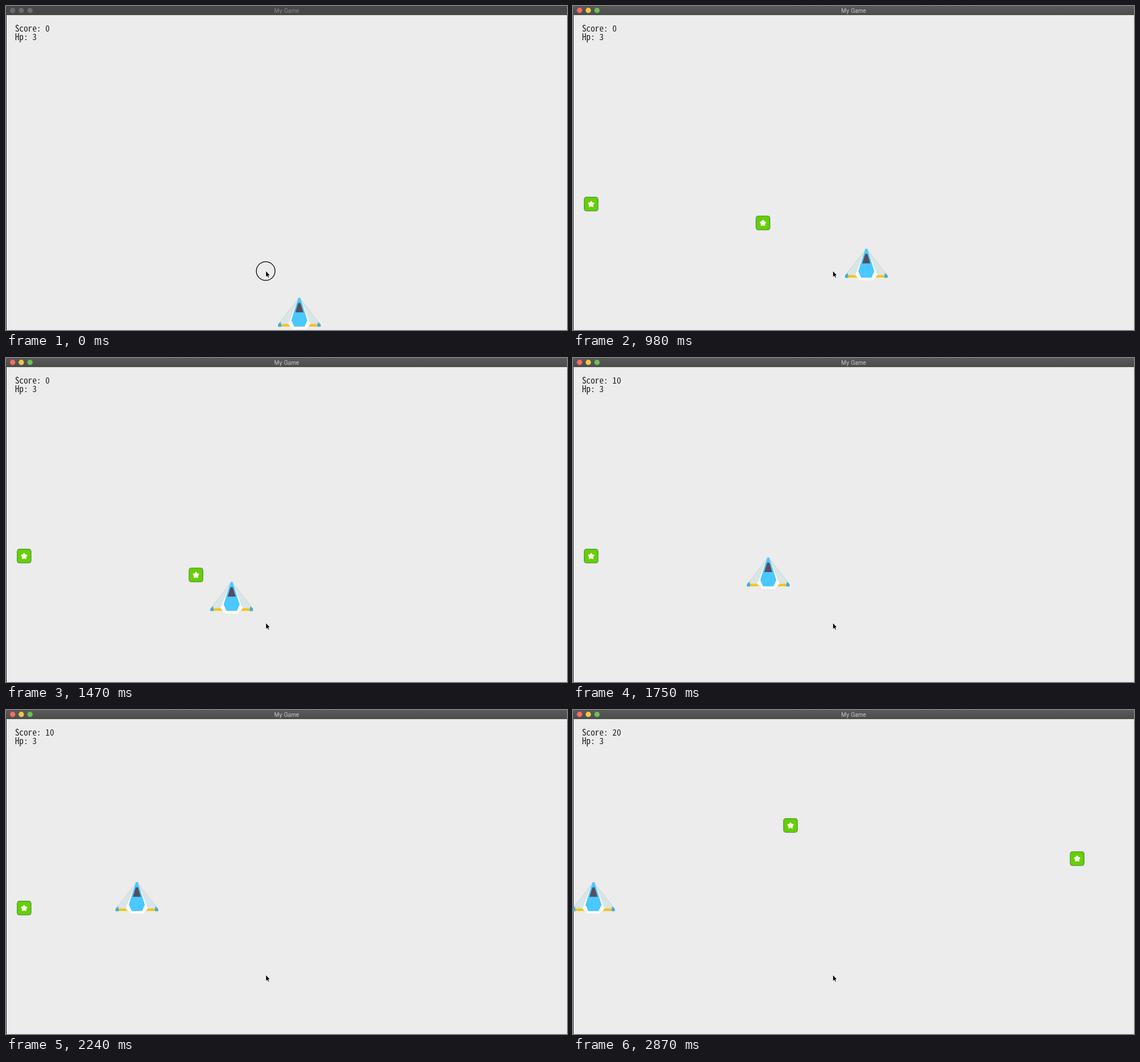
Recreate the animation shown at these times as an HTML page with a canvas. Size 984 by 569 pixels, loop 2940 ms.

```html
<!DOCTYPE html>
<html lang="en">
<head>
<meta charset="utf-8">
<title>My Game</title>
<style>
  html, body { margin: 0; width: 100%; height: 100%; overflow: hidden; background: #ececec; }
  canvas { display: block; }
</style>
</head>
<body>
<canvas id="stage" width="984" height="569"></canvas>
<script>
const ctx = document.getElementById('stage').getContext('2d');
const W = 984, H = 569, LOOP = 2940, STEP = 70;

const FOCUS = 70, STARS = 140, CLICK_END = 210, FIRST = 1680, SECOND = 2730;

// Turning points of the ship: time, centre x, top y
const path = [
  [660, 514.5, 512], [980, 514.5, 426], [1050, 483, 393], [1190, 483, 393],
  [1540, 374, 393], [1610, 348, 377], [1750, 342.5, 350], [1890, 337, 302], [2870, 36, 302]
];

// Pick the font size that gives a half-width cell of 7.63 px
const MONO = '"Noto Sans Mono CJK JP", "Noto Sans Mono CJK SC", "Noto Sans Mono", monospace';
ctx.font = '100px ' + MONO;
const monoFont = 763 / ctx.measureText('0').width + 'px ' + MONO;

function shipAt(t) {
  const i = Math.max(1, path.findIndex(p => p[0] >= t));
  const a = path[i - 1], b = path[i];
  const k = Math.max(0, (t - a[0]) / (b[0] - a[0]));
  return [a[1] + (b[1] - a[1]) * k, a[2] + (b[2] - a[2]) * k];
}

function poly(points, fill, stroke, width = 1) {
  ctx.beginPath();
  points.forEach(p => ctx.lineTo(...p));
  ctx.closePath();
  ctx.lineJoin = 'round';
  if (stroke) {
    ctx.strokeStyle = stroke;
    ctx.lineWidth = width;
    ctx.stroke();
  }
  ctx.fillStyle = fill;
  ctx.fill();
}

// Completes a right-hand outline with its mirror image
function mirrored(half, fill, stroke) {
  const left = half.map(([x, y]) => [-x, y]).reverse();
  poly(half.concat(left), fill, stroke);
}

function circle(x, y, r) {
  ctx.beginPath();
  ctx.arc(x, y, r, 0, Math.PI * 2);
}

function label(text, x, y, font, color, align = 'left') {
  ctx.font = font;
  ctx.fillStyle = color;
  ctx.textAlign = align;
  ctx.fillText(text, x, y);
}

function ship(x, y) {
  ctx.save();
  ctx.translate(x, y);
  mirrored([[1.5, 2], [35, 45], [33, 48]], '#d9e5e7', '#b4c0c3');
  ctx.fillStyle = '#f3c51d';
  ctx.fillRect(-33, 46.5, 66, 4.5);
  for (const side of [-1, 1]) {
    const tip = [[33, 43.5], [37, 47], [37, 51], [32, 51]];
    poly(tip.map(([px, py]) => [px * side, py]), '#35b0e4', '#5a93ac', 0.7);
  }
  mirrored([[2, 1], [19.5, 46], [11.5, 56.5]], '#fafafa', '#d3dadb');
  mirrored([[1.8, 0.5], [14, 40], [9, 51]], '#4ac8ff');
  mirrored([[2, 9.5], [7, 26]], '#574d61');
  ctx.restore();
}

function star(x, y) {
  ctx.beginPath();
  ctx.roundRect(x - 12.1, y - 12.1, 24.2, 24.2, 4);
  ctx.fillStyle = '#66d000';
  ctx.fill();
  ctx.strokeStyle = '#4f9548';
  ctx.lineWidth = 1.3;
  ctx.stroke();
  const points = [];
  for (let i = 0; i < 10; i++) {
    const a = i * Math.PI / 5 - Math.PI / 2, r = i % 2 ? 3.5 : 5.6;
    points.push([x + r * Math.cos(a), y + 0.3 + r * Math.sin(a)]);
  }
  poly(points, '#fff', '#fff');
}

function cursor() {
  const arrow = [[0, 0], [0, 9.5], [2.2, 7.5], [3.8, 11], [5, 10.4], [3.5, 7], [6.2, 6.7]];
  poly(arrow.map(([x, y]) => [456.2 + x, 466 + y]), '#000', '#fff');
}

function windowFrame(active) {
  ctx.fillStyle = '#ececec';
  ctx.fillRect(0, 0, W, H);
  ctx.fillStyle = '#292929';
  ctx.fillRect(0, 0, 1, H);

  const bar = ctx.createLinearGradient(0, 0, 0, 16);
  bar.addColorStop(0, active ? '#5a5a5a' : '#484848');
  bar.addColorStop(1, active ? '#4b4b4b' : '#464646');
  ctx.fillStyle = bar;
  ctx.fillRect(0, 0, W, 16);

  ['#ff6b60', '#f6c444', '#67c24f'].forEach((color, i) => {
    circle(11.6 + i * 15.25, 7.8, 4.7);
    ctx.fillStyle = active ? color : '#6b6b6b';
    ctx.fill();
  });
  label('My Game', 492.3, 11.6, '9.7px Inter, Roboto, sans-serif', active ? '#cecece' : '#8c8c8c', 'center');
}

function click(t) {
  ctx.globalAlpha = 1 - t / CLICK_END;
  circle(455.5, 465.5, 16.4);
  ctx.strokeStyle = '#000';
  ctx.lineWidth = 1.3;
  ctx.stroke();
  ctx.globalAlpha = 1;
}

function draw(t) {
  const score = t < FIRST ? 0 : t < SECOND ? 10 : 20;
  windowFrame(t >= FOCUS);

  if (t >= SECOND) {
    star(381.5, 202.7);
    star(884.3, 261);
  } else if (t >= STARS) {
    star(31.8, 347.8);
    if (t < FIRST) star(333.2, 381);
  }

  ship(...shipAt(t));
  label('Score: ' + score, 15.7, 45, monoFont, '#222');
  label('Hp: 3', 15.7, 60.2, monoFont, '#222');
  if (t < CLICK_END) click(t);
  cursor();
}

const start = performance.now();
function tick() {
  const t = (performance.now() - start) % LOOP;
  draw(Math.floor(t / STEP) * STEP);
  requestAnimationFrame(tick);
}
tick();
</script>
</body>
</html>
```
